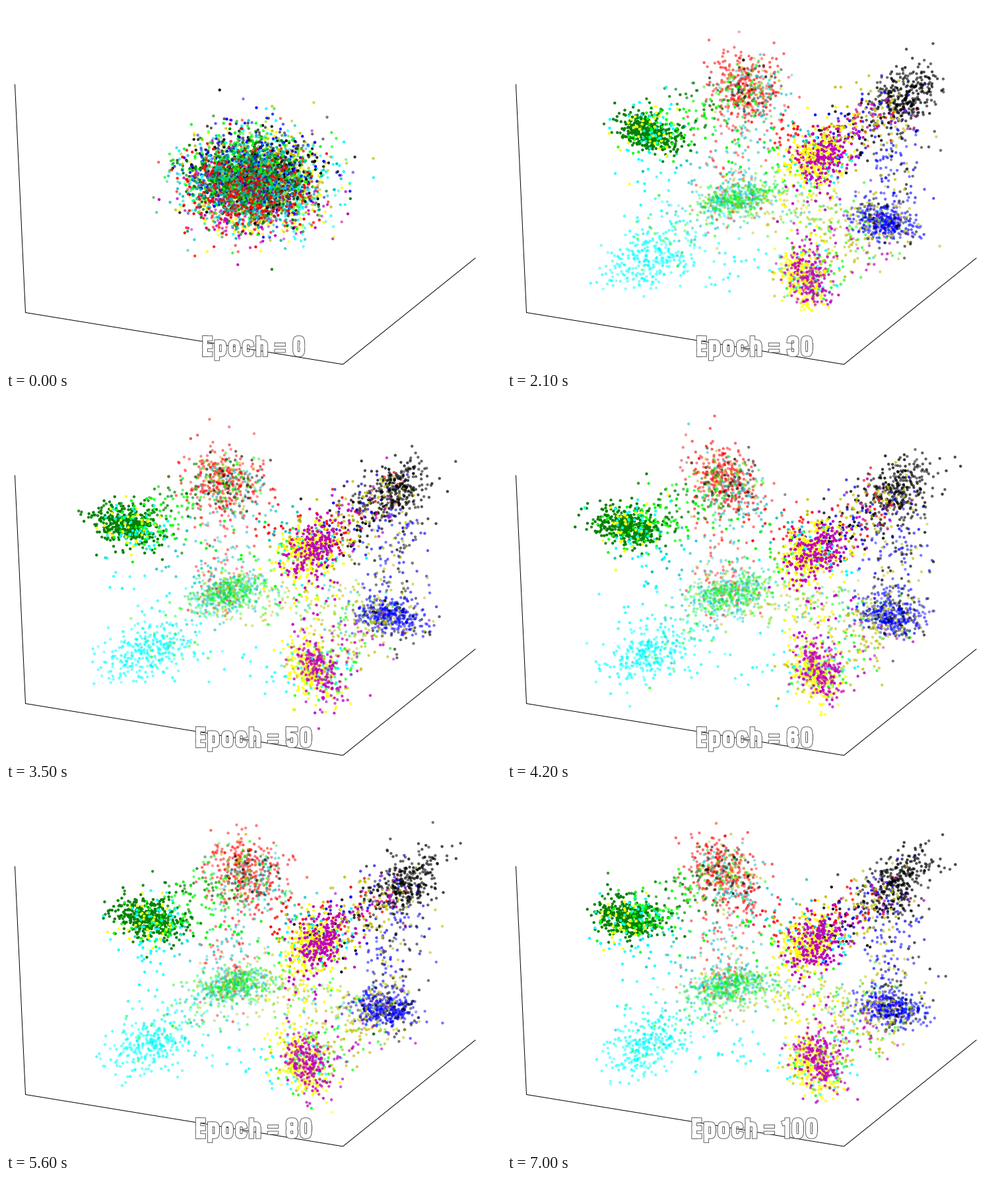
These frames come from a looping animation (750 by 550 pixels, 7700 ms). A matplotlib script:

```python
import numpy as np
import matplotlib.pyplot as plt
from matplotlib.animation import FuncAnimation
from matplotlib.collections import LineCollection
from matplotlib.colors import to_rgb

W, H, DPI = 750, 550, 100
PX = 72 / DPI
STEP_MS, STEPS = 700, 11

# ---- point clouds ---------------------------------------------------------
# Corners of the cube: x, y, spread x, spread y, opacity.
CORNERS = {
    "G": (204, 199, 25, 15, 0.95), "R": (348, 129, 27, 28, 0.52),
    "K": (595, 143, 26, 24, 0.64), "M": (468, 236, 22, 22, 0.97),
    "P": (337, 300, 30, 14, 0.42), "B": (582, 336, 25, 13, 0.55),
    "C": (207, 393, 32, 22, 0.55), "Y": (461, 419, 18, 24, 0.75),
}
MIDDLE = np.array((375, 275))

# Colour, home corners, then stray points around or between two corners.
CLASSES = [
    ("#ff0000", "R", "PR RM MK PP"),
    ("#00bfbf", "P", "RR PR PR PB CP RM GP"),
    ("#008000", "G", "GR"),
    ("#00ff00", "P", "GR GR PB PB GG GM RR BY YY CP PM"),
    ("#0000ff", "B", "KB KB MK"),
    ("#000000", "K", "BB KB MK RR"),
    ("#bfbf00", "", "PB PB PB MM BY BY MK MK KB YY PP RR BB"),
    ("#00ffff", "C", "CG CY YY MM CP GG"),
    ("#ffff00", "MY", "MY GG"),
    ("#bf00bf", "MY", "MK BY MY"),
]
PER_CLASS, HOME_WEIGHT = 450, 6
LABELS = np.repeat(np.arange(len(CLASSES)), PER_CLASS)
COLORS = np.array([to_rgb(c) for c, _, _ in CLASSES])[LABELS]


def place(corner, step):
    """Corner position: the cube sways, and sinks a little at first."""
    pos = np.array(CORNERS[corner][:2], float)
    dx, dy = MIDDLE - pos
    sway = np.sqrt(2) * np.cos(1.5 * np.pi * (step - 5.5))
    pos[0] += sway * (5 + 0.03 * dx + 0.07 * dy)
    pos[1] -= 20 * np.exp(-step / 3)
    return pos


def blob(rng, n, sx, sy, rho=0):
    u, v = rng.normal(0, 1, (2, n))
    return np.column_stack([sx * u, sy * (rho * u + np.sqrt(1 - rho**2) * v)])


def home(rng, n, corner, step):
    _, _, sx, sy, opacity = CORNERS[corner]
    pos = place(corner, step)
    d = pos - MIDDLE
    rho = 0.8 * d[0] * d[1] / (d @ d)
    return pos + blob(rng, n, sx, sy, rho), np.full(n, opacity)


def stray(rng, n, pair, step):
    a, b = (place(c, step) for c in pair)
    t = rng.uniform(0.05, 0.95, n)
    pts = a + np.outer(t, b - a) + blob(rng, n, 26, 21)
    oa, ob = (CORNERS[c][-1] for c in pair)
    return pts, oa + (ob - oa) * t


def class_cloud(rng, k, step):
    _, homes, pairs = CLASSES[k]
    pairs = pairs.split()
    unit = PER_CLASS / (HOME_WEIGHT * len(homes or " ") + len(pairs))
    if not homes:
        unit = PER_CLASS / len(pairs)
    parts = [home(rng, int(HOME_WEIGHT * unit) + 1, c, step) for c in homes]
    parts += [stray(rng, int(unit) + 1, p, step) for p in pairs]
    pts = np.vstack([p for p, _ in parts])[:PER_CLASS]
    alpha = np.concatenate([a for _, a in parts])[:PER_CLASS]
    side = 5 if k % 2 else -5
    return pts + (side, 0), alpha


def trained_cloud(rng, step):
    parts = [class_cloud(rng, k, step) for k in range(len(CLASSES))]
    pts = np.vstack([p for p, _ in parts])
    alpha = np.concatenate([a for _, a in parts])
    alpha = np.clip(alpha + rng.normal(0, 0.07, len(alpha)), 0.28, 1)
    return pts, alpha, LABELS + rng.normal(0, 3 / step, len(LABELS))


def start_cloud(rng):
    n = len(LABELS)
    turn = 2 * np.pi * (LABELS - 4) / len(CLASSES)
    shift = 15 * np.column_stack([np.sin(turn), -np.cos(turn)])
    pts = (375, 266) + shift + blob(rng, n, 47, 32)
    return pts, rng.uniform(0.5, 1, n), rng.normal(0, 2, n) - LABELS


# ---- heavy condensed lettering --------------------------------------------
LOW, XH, TOP = 4, 22, 28
LEFT, RIGHT = 5, 15.5


def ring(lo, hi, a0=0, a1=360):
    t = np.radians(np.linspace(a0, a1, 60))
    c, s = np.cos(t), np.sin(t)
    return np.column_stack([
        (LEFT + RIGHT) / 2 + (RIGHT - LEFT) / 2 * np.sign(c) * abs(c) ** 0.5,
        (lo + hi) / 2 + (hi - lo) / 2 * np.sign(s) * abs(s) ** 0.5])


def down(x, hi=TOP, lo=LOW):
    return [(x, hi), (x, lo)]


def bar(y, x0=LEFT, x1=RIGHT):
    return [(x0, y), (x1, y)]


GLYPHS = {
    "E": [down(LEFT)] + [bar(y, x1=12.5) for y in (LOW, 16, TOP)],
    "p": [down(LEFT, XH, -2), ring(LOW, XH)],
    "o": [ring(LOW, XH)],
    "c": [ring(LOW, XH, 25, 335)],
    "h": [down(LEFT), ring(LOW, XH, 0, 180), down(RIGHT, 13)],
    "=": [bar(9, LOW), bar(18.5, LOW)],
    "0": [ring(LOW, TOP)],
    "1": [down(9), [(4.5, 24), (9, 25.5)]],
    "2": [np.vstack([ring(14, TOP, 180, 0), [(RIGHT, 19), (LEFT, 6)]]),
          bar(LOW)],
    "3": [ring(16, TOP, 170, -80), ring(LOW, 17, 80, -170)],
    "4": [down(13), [(11, TOP), (LEFT, 10)], bar(9)],
    "5": [down(LEFT, lo=17), bar(TOP), ring(LOW, 19, 130, -165)],
    "6": [ring(LOW, TOP, 20, 270), ring(LOW, 18)],
    "7": [bar(TOP, LOW, 11.5), [(11.5, 26), (7.5, LOW)]],
    "8": [ring(RIGHT, TOP), ring(LOW, 16.5)],
    "9": [ring(14, TOP), ring(LOW, TOP, 90, -160)],
}


def lettering(text, cx=375.5, base=531.5):
    x, lines, widths = 0, [], []
    for ch in text:
        strokes = [np.array(s, float) for s in GLYPHS.get(ch, [])]
        lines += [s * (1, -1) + (x, base) for s in strokes]
        widths += [5.8 if ch == "=" else 8.4] * len(strokes)
        x += max(s[:, 0].max() for s in strokes) + 5.5 if strokes else 7
    return [s + (cx - x / 2, 0) for s in lines], np.array(widths)


# ---- figure ---------------------------------------------------------------
fig = plt.figure(figsize=(W / DPI, H / DPI), dpi=DPI, facecolor="white")
ax = fig.add_axes([0, 0, 1, 1])
ax.set(xlim=(0, W), ylim=(H, 0))
ax.axis("off")

ax.plot([13.5, 29.5, 510.5, 711], [119, 464.5, 543, 382], color="black",
        lw=PX, zorder=1)
dots = ax.scatter(*np.zeros((2, len(LABELS))), s=10, linewidths=0, zorder=2)
rim, fill = (ax.add_collection(LineCollection(
    [], colors=c, capstyle="projecting", joinstyle="round", snap=False,
    zorder=z)) for c, z in (("#505050", 3), ("white", 4)))


def update(step):
    rng = np.random.default_rng(100 + step)
    pts, alpha, rank = trained_cloud(rng, step) if step else start_cloud(rng)
    order = np.argsort(rank)
    dots.set_offsets(pts[order])
    dots.set_facecolors(np.column_stack([COLORS, alpha])[order])
    lines, widths = lettering(f"Epoch = {step * 10}")
    for part, inset in ((rim, 0), (fill, 1.8)):
        part.set_segments(lines)
        part.set_linewidths((widths - inset) * PX)
    return dots, rim, fill


anim = FuncAnimation(fig, update, frames=STEPS, interval=STEP_MS,
                     init_func=lambda: update(0), repeat=True, repeat_delay=0)
plt.show()
```
